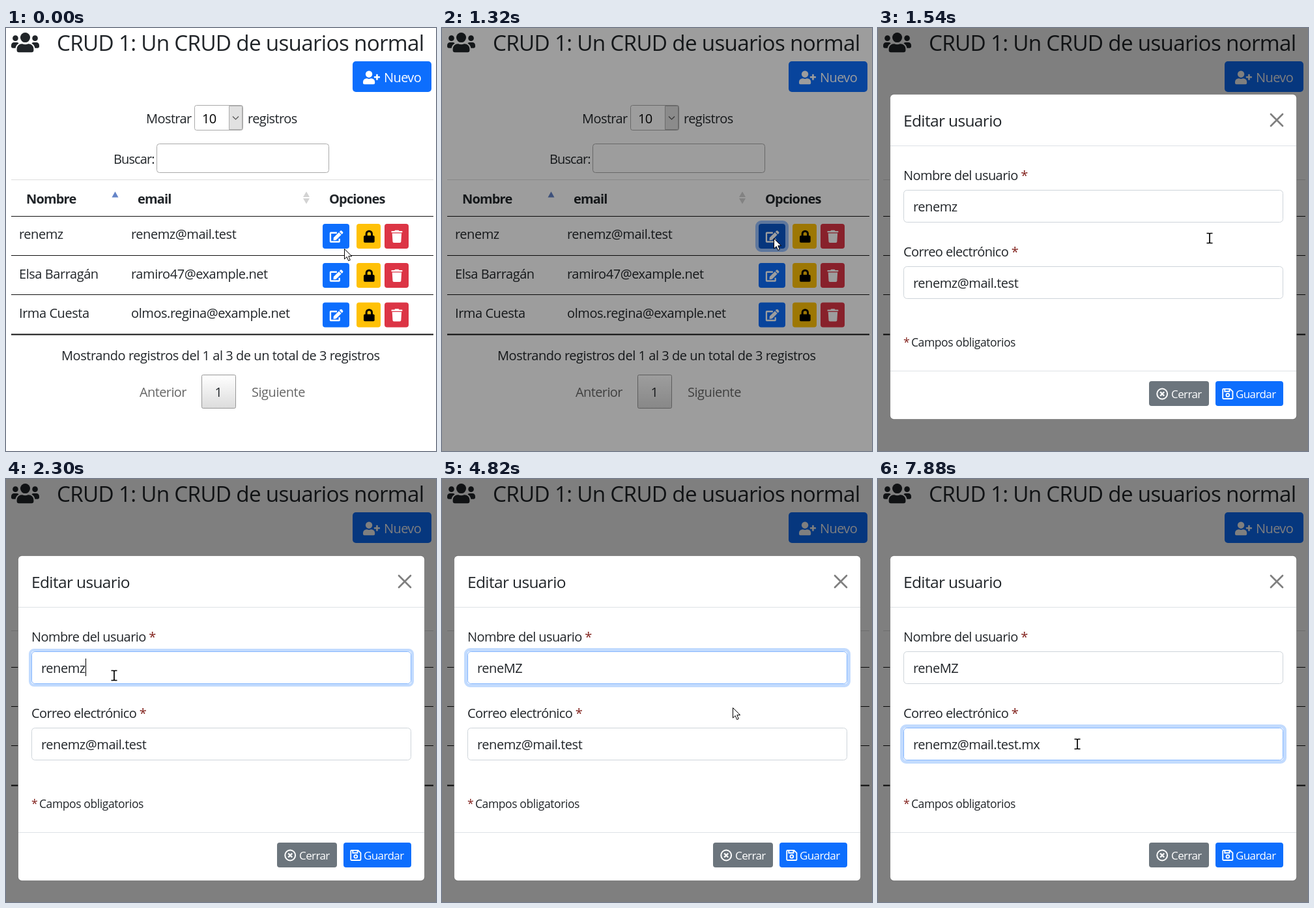
An HTML page for the animation above (8000 ms loop, 660x648 px).

```html
<!DOCTYPE html>
<html lang="es">
<head>
<meta charset="utf-8">
<title>CRUD de usuarios</title>
<style>
  html, body { margin: 0; width: 100%; height: 100%; overflow: hidden; background: #fff; }
  svg { display: block; }
  text { font: 20px "Open Sans", "Noto Sans", sans-serif; letter-spacing: -.03em; fill: #212529; white-space: pre; }
  .title { font-size: 33.2px; letter-spacing: -.021em; }
  .head { font-weight: 700; letter-spacing: -.042em; }
  .info, .cell { letter-spacing: -.0225em; }
  .dim { fill: #666; }
  .h5 { font-size: 24.5px; letter-spacing: -.026em; }
  .note { font-size: 17.5px; letter-spacing: -.024em; }
  .btn { font-size: 17px; letter-spacing: -.035em; }
  .tip { font-size: 15px; }
  .white { fill: #fff; }
  .req { fill: #83241f; }
  .box { fill: #fff; stroke: #aaa; }
  .field { fill: #fff; stroke: #ced4da; }
  .field.on { stroke: #86b7fe; }
  .ring { fill: none; stroke: #c2dbfe; }
  .line { fill: none; stroke: #dee2e6; }
</style>
</head>
<body>
<svg width="660" height="648" viewBox="0 0 660 648">
  <defs>
    <linearGradient id="page" x2="0" y2="1">
      <stop stop-color="#fff"/><stop offset="1" stop-color="#dcdcdc"/>
    </linearGradient>
    <path id="side" d="M173 275A64 64 0 0 0 128 256H64a64 64 0 0 0-64 64v32a32 32 0 0 0 32 32h66a155 155 0 0 1 75-109z"/>
    <g id="users">
      <circle cx="96" cy="160" r="64"/><circle cx="544" cy="160" r="64"/><circle cx="320" cy="144" r="112"/>
      <use href="#side"/><use href="#side" transform="matrix(-1 0 0 1 640 0)"/>
      <path d="M397 288h-8.500a158 158 0 0 1-137 0h-8.500A115 115 0 0 0 128 403v29a48 48 0 0 0 48 48h288a48 48 0 0 0 48-48v-29a115 115 0 0 0-115-115z"/>
    </g>
    <g id="add">
      <circle cx="224" cy="128" r="128"/>
      <path d="M314 288h-17a174 174 0 0 1-146 0h-17A134 134 0 0 0 0 422v42a48 48 0 0 0 48 48h352a48 48 0 0 0 48-48v-42A134 134 0 0 0 314 288z"/>
      <rect x="416" y="208" width="224" height="64" rx="16"/><rect x="496" y="128" width="64" height="224" rx="16"/>
    </g>
    <g id="edit" fill="#fff">
      <path d="M310 96H48a16 16 0 0 0-16 16v352a16 16 0 0 0 16 16h352a16 16 0 0 0 16-16V345" fill="none" stroke="#fff" stroke-width="64"/>
      <path d="M396 78 498 180 274 406 182 416Q158 418 160 394L170 302z"/>
      <path d="M565 60 516 11Q488-11 461 11L420 53 523 157 565 115Q587 88 565 60z"/>
    </g>
    <g id="lock">
      <rect y="224" width="448" height="288" rx="48"/>
      <path d="M112 240v-88a112 112 0 0 1 224 0v88" fill="none" stroke="#000" stroke-width="80"/>
    </g>
    <g id="trash" fill="#fff">
      <rect x="136" width="176" height="70" rx="24"/><rect y="32" width="448" height="64" rx="16"/>
      <path d="M32 128h384l-21 339a48 48 0 0 1-48 45H101a48 48 0 0 1-48-45z"/>
    </g>
    <g id="save" fill="none" stroke="#fff" stroke-width="48">
      <path d="M24 80a24 24 0 0 1 24-24h270l106 106v270a24 24 0 0 1-24 24H48a24 24 0 0 1-24-24zM104 60v100h190V60"/>
      <circle cx="224" cy="304" r="64"/>
    </g>
  </defs>

  <rect width="660" height="648" fill="#fff"/>
  <use href="#users" transform="translate(8 4.900) scale(.0672)" fill="#212529"/>
  <text class="title" x="78" y="35">CRUD 1: Un CRUD de usuarios normal</text>
  <rect x="532" y="51" width="121" height="47" rx="5" fill="#0d6efd"/>
  <use href="#add" transform="translate(548 65.500) scale(.0406)" fill="#fff"/>
  <text class="white" x="580" y="83">Nuevo</text>

  <text x="215" y="146">Mostrar</text>
  <rect class="box" x="289.500" y="118.500" width="74" height="38" rx="3"/>
  <path d="M342.500 119.500h20v36h-20z" fill="#e1e1e1" stroke="#adadad"/>
  <path d="M348 135.500l4.500 4.500 4.500-4.500" fill="none" stroke="#555" stroke-width="1.200"/>
  <text x="301" y="146" style="fill:#000">10</text>
  <text x="371" y="146">registros</text>
  <text x="165" y="208" style="letter-spacing:-.045em">Buscar:</text>
  <rect class="box" x="231.500" y="177.500" width="264" height="44" rx="4"/>

  <path d="M8 232.500h648" stroke="#ddd"/>
  <text class="head" x="31" y="269">Nombre</text>
  <text class="head" x="202" y="269">email</text>
  <text class="head" x="496" y="269">Opciones</text>
  <path d="M167.500 250.500l5 9h-10z" fill="#6484c8"/>
  <path d="M461 250.500l5 8.500h-10zM461 269.500l5-8.500h-10z" fill="#d3d3d3"/>
  <rect id="hover" x="8" y="289" width="648" height="59" fill="#d9d9d9"/>
  <g id="rows"></g>
  <path d="M8 288.500h648M8 348.500h648M8 408.500h648" stroke="#111" stroke-width="1.200"/>
  <path d="M8 469.500h648" stroke="#111" stroke-width="1.800"/>

  <text class="info" x="85" y="509">Mostrando registros del 1 al 3 de un total de 3 registros</text>
  <text class="dim" x="205" y="565">Anterior</text>
  <rect x="300.500" y="531.500" width="52" height="51" rx="2" fill="url(#page)" stroke="#979797"/>
  <text x="326" y="565" text-anchor="middle">1</text>
  <text class="dim" x="377" y="565" style="letter-spacing:-.023em">Siguiente</text>

  <g id="tip">
    <rect x="508.500" y="347.500" width="54" height="26" fill="#fff" stroke="#767676"/>
    <text class="tip" x="516" y="367">Editar</text>
  </g>

  <rect id="shade" width="660" height="648"/>

  <g id="modal">
    <rect x="18.500" y="117.500" width="624" height="498" rx="6" fill="#fff" stroke="#000" stroke-opacity=".3"/>
    <text class="h5" x="39" y="167">Editar usuario</text>
    <path d="M603 148l18 18M621 148l-18 18" stroke="#7f7f7f" stroke-width="2.700" stroke-linecap="round"/>
    <path class="line" d="M19 196.500h623M19 541.500h623"/>
    <text x="39" y="249">Nombre del usuario <tspan class="req">*</tspan></text>
    <text x="39" y="366">Correo electrónico <tspan class="req">*</tspan></text>
    <rect class="ring" id="glow"/>
    <rect class="field" id="field1" x="39.500" y="264.500" width="582" height="49" rx="5"/>
    <rect class="field" id="field2" x="39.500" y="381.500" width="582" height="49" rx="5"/>
    <text class="cell" id="name" x="54" y="297"></text>
    <text class="cell" id="mail" x="54" y="414"></text>
    <rect id="caret" width="1" height="27"/>
    <text class="note req" x="39" y="504">*</text>
    <text class="note" x="51" y="504">Campos obligatorios</text>
    <rect x="416" y="557" width="92" height="38" rx="4" fill="#6c757d"/>
    <g fill="none" stroke="#fff" stroke-width="2">
      <circle cx="436.200" cy="576.500" r="7.900"/>
      <path d="M433.200 573.500l6 6M439.200 573.500l-6 6" stroke-width="2.400"/>
    </g>
    <text class="btn white" x="450" y="583">Cerrar</text>
    <rect x="518" y="557" width="104" height="38" rx="4" fill="#0d6efd"/>
    <use href="#save" transform="translate(528.300 566.700) scale(.038)"/>
    <text class="btn white" x="549" y="583">Guardar</text>
  </g>

  <g id="cursor">
    <path id="arrow" d="M.5.5V16L4.200 12.600 6.700 18.500 9.300 17.400 6.800 11.600H11.700z" fill="#fff" stroke="#000"/>
    <path id="hand" d="M-1.500 2Q0-1 1.500 2V8Q4 6 5 8.500 7 7.500 8 9.500 10 9 10 12V15L8.500 19.500H0L-5 12.500Q-5.500 9.500-1.500 12z" fill="#fff" stroke="#000" stroke-width="1.200"/>
    <g id="beam" fill="none">
      <path d="M-5-7.500H5M-5 7.500H5M0-8V8" stroke="#fff" stroke-width="4"/>
      <path d="M-4.500-7.500H-1L0-6.500 1-7.500H4.500M-4.500 7.500H-1L0 6.500 1 7.500H4.500M0-7V7" stroke="#000" stroke-width="1.700"/>
    </g>
  </g>
</svg>
<script>
const LOOP = 8000;
const $ = id => document.getElementById(id);
const set = (id, attrs) => { for (const k in attrs) $(id).setAttribute(k, attrs[k]); };
const show = (id, on) => { $(id).style.display = on ? '' : 'none'; };

const people = [
  ['renemz', 'renemz@mail.test'],
  ['Elsa Barragán', 'ramiro47@example.net'],
  ['Irma Cuesta', 'olmos.regina@example.net'],
];
const mail = people[0][1];

const icon = (id, x, y, s) => `<use href="#${id}" transform="translate(${x} ${y}) scale(${s})"/>`;
const button = (x, y, w, fill, id = '') =>
  `<rect ${id && `id="${id}"`} x="${x}" y="${y}" width="${w}" height="38" rx="4" fill="${fill}"/>`;

$('rows').innerHTML = '<rect id="press" fill="none" stroke="#98c1fe"/>' + people.map(([who, address], i) => {
  const y = 300 + 60 * i + (i === 2 ? .5 : 0);
  const base = [323, 384, 444][i];
  return `<text class="cell" x="20" y="${base}">${who}</text><text class="cell" x="192" y="${base}">${address}</text>` +
    button(486, y, 41, '#0d6efd', i ? '' : 'editBtn') + icon('edit', 496.8, y + 10.3, .0358) +
    button(538, y, 37, '#ffc107') + icon('lock', 549, y + 9.700, .0372) +
    button(581, y, 37, '#dc3545') + icon('trash', 591.5, y + 9.700, .0376);
}).join('');

// Each step changes part of the state and holds until the next one.
const start = {
  at: [519, 338], cursor: 'arrow', hover: false, btn: '#0d6efd', tip: false, press: 0,
  shade: 0, open: 0, dy: -50, focus: 0, glow: 0, caret: false, name: 'renemz', mail,
};
const steps = [
  [320, { at: [515, 331], hover: true }],
  [430, { at: [511, 325], cursor: 'hand', btn: '#0c66ea' }],
  [540, { at: [509, 322], btn: '#0b5ed7' }],
  [990, { tip: true }],
  [1100, { tip: false, press: 3, btn: '#0a58ca' }],
  [1210, { press: 5, shade: .02 }],
  [1320, { cursor: 'arrow', hover: false, shade: .385 }],
  [1430, { shade: .5, open: .27, dy: -40 }],
  [1540, { cursor: 'beam', open: 1, dy: -16 }],
  [1650, { dy: -1 }],
  [1760, { dy: 0 }],
  [1870, { at: [470, 320] }],
  [1980, { at: [380, 314] }],
  [2090, { at: [265, 306] }],
  [2190, { at: [180, 302], focus: 1, glow: 1, caret: true }],
  [2300, { at: [166, 301], glow: 4 }],
  [2410, { at: [310, 328], cursor: 'arrow', glow: 5 }],
  [2520, { at: [446, 350] }],
  [2740, { caret: false }],
  [3290, { caret: true, name: 'renem' }],
  [3400, { name: 'rene' }],
  [3840, { caret: false }],
  [4280, { caret: true, name: 'reneM' }],
  [4600, { name: 'reneMZ' }],
  [4820, { caret: false }],
  [5260, { at: [432, 357] }],
  [5370, { at: [400, 371], caret: true }],
  [5480, { at: [358, 390], cursor: 'beam' }],
  [5590, { at: [322, 402] }],
  [5690, { at: [309, 406], focus: 2, glow: 2 }],
  [5800, { at: [306, 406], glow: 4 }],
  [5910, { glow: 5 }],
  [6240, { caret: false }],
  [6790, { caret: true }],
  [7010, { mail: mail + '.' }],
  [7230, { mail: mail + '.m' }],
  [7440, { mail: mail + '.mx' }],
  [7880, { caret: false }],
];

// Outline of width w around a box.
const around = (id, x, y, w, h, size) => set(id, {
  x: x - size / 2, y: y - size / 2, width: w + size, height: h + size,
  rx: 4 + size / 2, 'stroke-width': size,
});

function draw(s) {
  show('hover', s.hover);
  show('tip', s.tip);
  set('editBtn', { fill: s.btn });
  around('press', 486, 300, 41, 38, s.press);
  set('shade', { opacity: s.shade });
  set('modal', { opacity: s.open, transform: `translate(0 ${s.dy})` });
  $('name').textContent = s.name;
  $('mail').textContent = s.mail;
  $('field1').classList.toggle('on', s.focus === 1);
  $('field2').classList.toggle('on', s.focus === 2);
  const top = s.focus === 2 ? 381 : 264;
  around('glow', 39, top, 583, 50, s.glow);
  show('caret', s.caret);
  if (s.caret) {
    const len = $(s.focus === 2 ? 'mail' : 'name').getComputedTextLength();
    set('caret', { x: Math.round(54 + len), y: top + 11 });
  }
  for (const c of ['arrow', 'hand', 'beam']) show(c, c === s.cursor);
  set('cursor', { transform: `translate(${s.at})` });
}

const origin = performance.now();
let last = -1;
function tick() {
  const t = (performance.now() - origin) % LOOP;
  const past = steps.filter(([from]) => from <= t);
  if (past.length !== last) {
    last = past.length;
    draw(Object.assign({}, start, ...past.map(p => p[1])));
  }
  requestAnimationFrame(tick);
}
tick();
</script>
</body>
</html>
```
